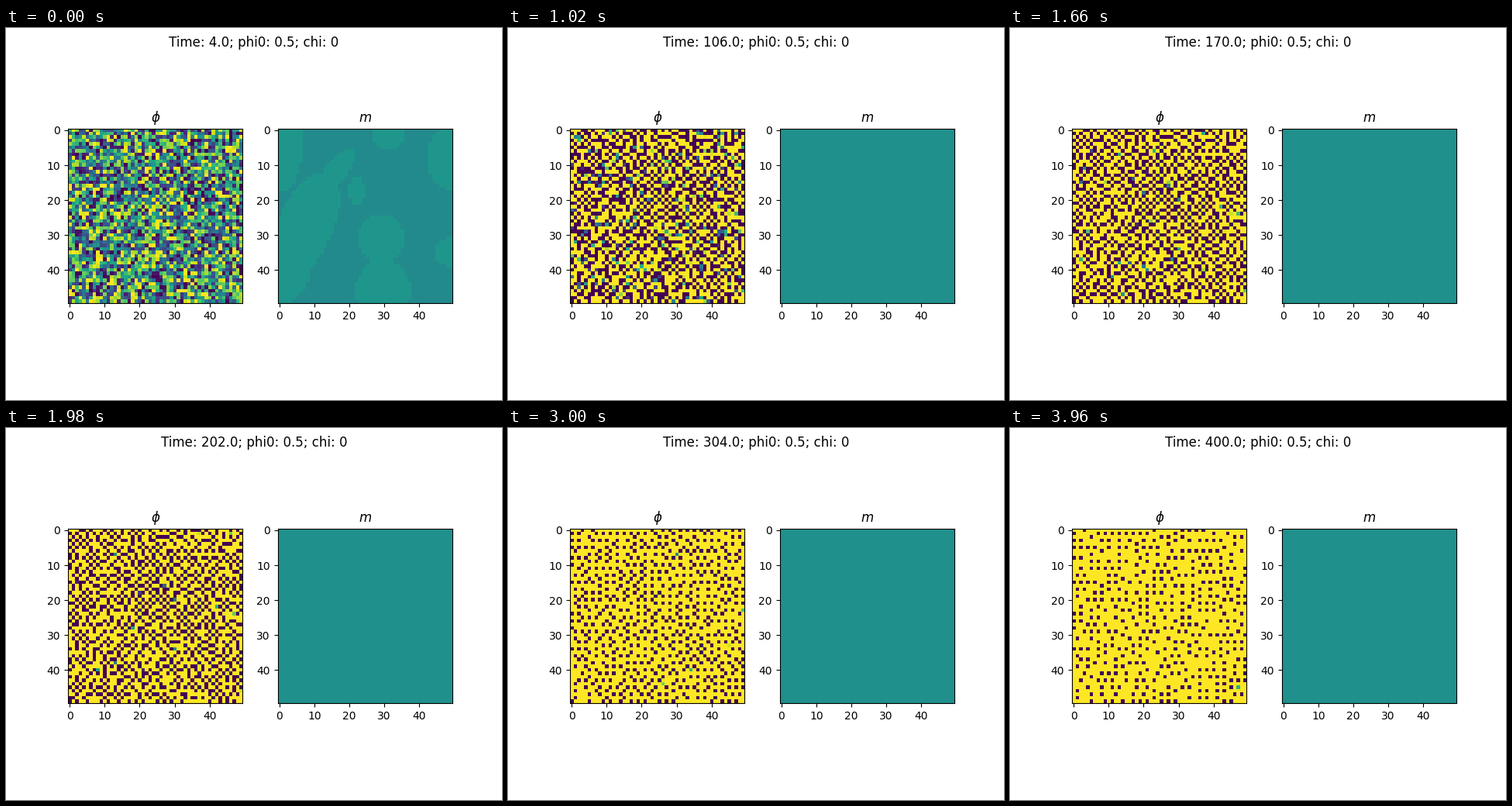
A matplotlib script for the animation above (3.98 s loop, 640 px wide and 480 px high).

```python
import numpy as np
import matplotlib.pyplot as plt
from matplotlib.animation import FuncAnimation

N, FRAMES, DT, T0 = 50, 199, 2.0, 4.0
rng = np.random.default_rng(7)
rows, cols = np.mgrid[0:N, 0:N]


def time_at(i):
    return T0 + DT * i


def near(a):
    """Sum over the four side neighbours, wrapping at the edges."""
    return sum(np.roll(a, d, ax) for ax in (0, 1) for d in (-1, 1))


def diagonal(a):
    return sum(np.roll(a, (dy, dx), (0, 1)) for dy in (-1, 1) for dx in (-1, 1))


def ellipse(cx, cy, rx, ry, deg=0):
    a = np.radians(deg)
    dx, dy = cols - cx, rows - cy
    u = dx * np.cos(a) + dy * np.sin(a)
    v = dy * np.cos(a) - dx * np.sin(a)
    return (u / rx) ** 2 + (v / ry) ** 2 < 1


def simulate_phi():
    """Neighbours repel into a checkerboard, then dark cells thin out."""
    s = np.clip(rng.uniform(-1.15, 1.15, (N, N)), -1, 1)
    rise = rng.uniform(0.9, 2.6, (N, N))
    melting = np.zeros((N, N), bool)
    out = []
    for i in range(FRAMES):
        out.append((s + 1) / 2)
        t = time_at(i)
        rate = 0.02 * (1 + (t / 200) ** 2)
        grown = s + DT * rate * (s - 0.9 * near(s) / 4 + 0.1)
        s = np.clip(np.where(melting, s + rise, grown), -1, 1)

        dark = (s < -0.9) & ~melting
        share = np.interp(t, [105, 106, 170, 236, 304, 400],
                          [1, 0.46, 0.42, 0.36, 0.245, 0.165])
        surplus = min(int(dark.sum() - share * N * N), 14)
        if surplus > 0:
            key = near(dark * 1.0) + 0.3 * diagonal(dark * 1.0)
            key += rng.uniform(0, 1.5, (N, N))
            key[~dark] = -1
            melting.flat[np.argsort(key, axis=None)[-surplus:]] = True
    return out


light = np.any([
    ellipse(0, 4, 6.5, 14),
    ellipse(7, 28, 8, 17, 25),
    ellipse(16, 12, 3, 8, 40),
    ellipse(0, 38, 9, 12),
    ellipse(22, 17.5, 2.2, 4),
    ellipse(31, 0, 5, 5.5),
    ellipse(50, 8, 8, 9.5),
    ellipse(50, 35, 6, 4.5),
    ellipse(29, 31, 6.5, 7),
    ellipse(29, 38, 4, 5),
    ellipse(29.5, 46, 8, 8.5),
], axis=0)
pool = ellipse(35.5, 20, 11, 7, 45)


def m_at(t):
    """Patches that quickly even out, leaving one faint pool for a while."""
    patches = np.where(light, 0.022, -0.022) * np.exp(-(t - T0) / 10)
    faint = 0.007 * np.exp(-((t - 46) / 20) ** 2)
    if t > 30:
        patches = 0
    return 0.502 + patches - faint * pool


phi = simulate_phi()

fig, axes = plt.subplots(1, 2, figsize=(6.4, 4.8), dpi=100)
title = fig.suptitle("")
images = []
for ax, name, data in zip(axes, (r"$\phi$", "$m$"), (phi[0], m_at(T0))):
    images.append(ax.imshow(data, cmap="viridis", vmin=0, vmax=1,
                            interpolation="nearest"))
    ax.set_title(name)
    ax.set_xticks(range(0, N, 10))
    ax.set_yticks(range(0, N, 10))


def update(i):
    t = time_at(i)
    images[0].set_data(phi[i])
    images[1].set_data(m_at(t))
    title.set_text(f"Time: {t:.1f}; phi0: 0.5; chi: 0")
    return [*images, title]


anim = FuncAnimation(fig, update, frames=FRAMES, interval=20, repeat=True)
plt.show()
```
